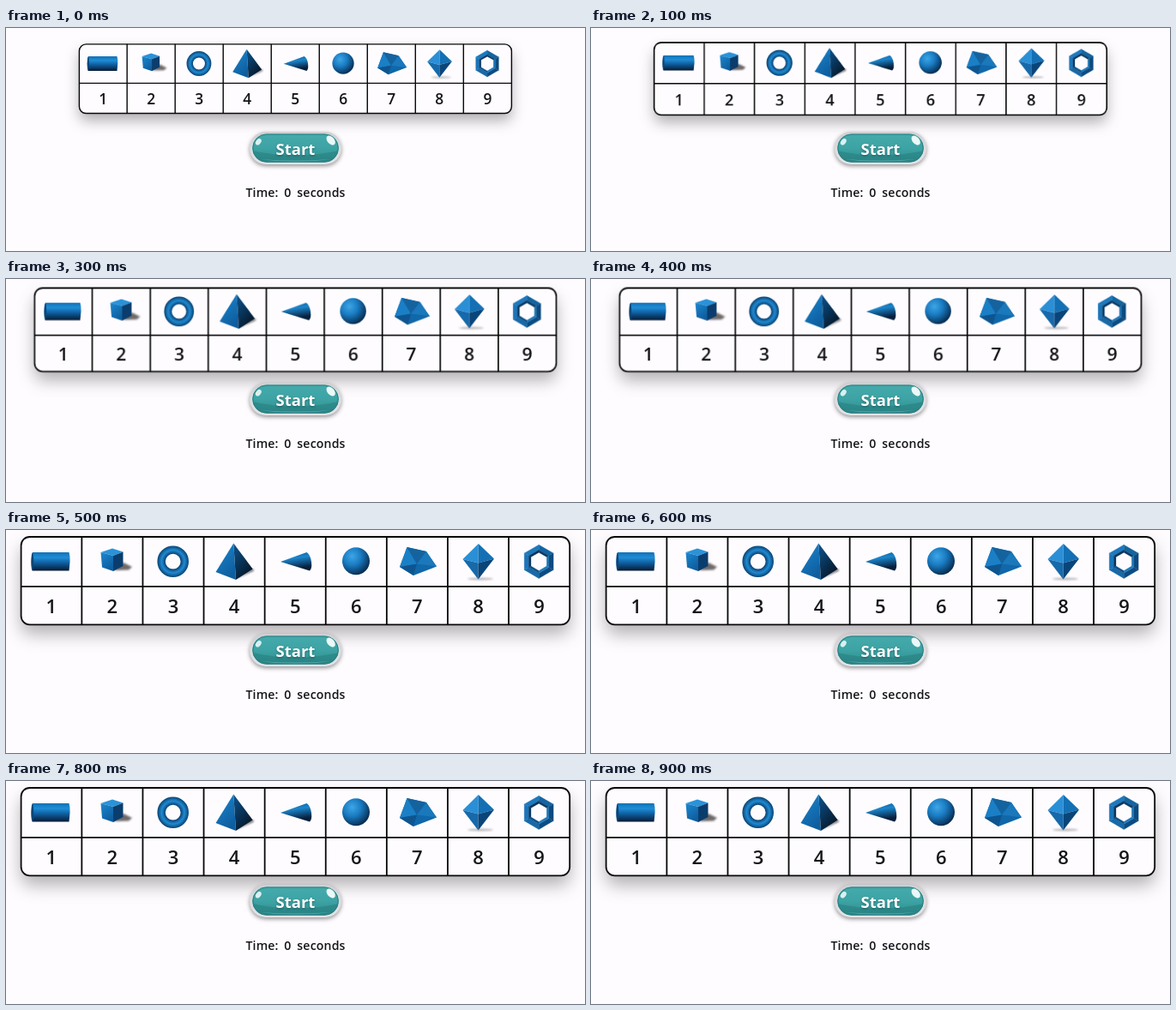
Recreate the animation shown at these times as an HTML page. Size 675x260 px, loop 1 s.

```html
<!DOCTYPE html>
<html lang="en">
<head>
<meta charset="utf-8">
<title>Shape key</title>
<style>
  html, body { margin: 0; width: 100%; height: 100%; overflow: hidden; background: #fefcff; }
  svg { display: block; width: 675px; height: 260px; }
  text { font-family: "Open Sans", "Noto Sans", sans-serif; text-anchor: middle; fill: #151519; }
  #key { transform-origin: 337.4px 59.2px; }
  .card { fill: #fefcff; filter: drop-shadow(0 11px 10px rgba(0, 0, 0, .3)); }
  .grid { fill: none; stroke: #08080a; stroke-width: 1.8; }
  .digit { font-size: 22px; font-weight: 600; }
  .time { font-size: 14.1px; font-weight: 600; letter-spacing: .15px; word-spacing: 3px; }
  .start { font-size: 18.5px; font-weight: 700; fill: #fff; filter: drop-shadow(0 1px 1px rgba(0, 50, 55, .5)); }
  .rim { filter: drop-shadow(0 2px 2.5px rgba(0, 0, 0, .42)); }
  .soft { filter: blur(1.1px); }
</style>
</head>
<body>
<svg viewBox="0 0 675 260">
  <defs>
    <linearGradient id="tube" x1="0" y1="0" x2="0" y2="1">
      <stop offset="0" stop-color="#1272b6"/><stop offset=".28" stop-color="#1f8dd6"/>
      <stop offset=".6" stop-color="#0e5a9a"/><stop offset="1" stop-color="#071b34"/>
    </linearGradient>
    <linearGradient id="cone" x1="0" y1="0" x2=".25" y2="1">
      <stop offset=".1" stop-color="#0e5f9e"/><stop offset=".4" stop-color="#1c86cc"/>
      <stop offset=".95" stop-color="#061f3c"/>
    </linearGradient>
    <linearGradient id="dark" x1="0" y1="0" x2=".6" y2="1">
      <stop offset="0" stop-color="#0c5590"/><stop offset="1" stop-color="#061729"/>
    </linearGradient>
    <linearGradient id="face" x1="0" y1="0" x2=".5" y2="1">
      <stop offset="0" stop-color="#1c88d0"/><stop offset="1" stop-color="#0e5e9f"/>
    </linearGradient>
    <radialGradient id="ball" cx=".36" cy=".32" r=".72">
      <stop offset="0" stop-color="#3fa6e6"/><stop offset=".45" stop-color="#1a7cc3"/>
      <stop offset="1" stop-color="#06294c"/>
    </radialGradient>
    <radialGradient id="ring" gradientUnits="userSpaceOnUse" cx="194.700" cy="36.700" r="18.500">
      <stop offset=".46" stop-color="#083c6c"/><stop offset=".72" stop-color="#1f8ad2"/>
      <stop offset="1" stop-color="#09406f"/>
    </radialGradient>
    <linearGradient id="silver" x1="0" y1="0" x2="0" y2="1">
      <stop offset="0" stop-color="#cfcfd1"/><stop offset=".5" stop-color="#dcdcde"/>
      <stop offset="1" stop-color="#e4e4e6"/>
    </linearGradient>
    <linearGradient id="teal" x1="0" y1="0" x2="0" y2="1">
      <stop offset="0" stop-color="#45aaab"/><stop offset=".5" stop-color="#3da3a4"/>
      <stop offset="1" stop-color="#2f8b8b"/>
    </linearGradient>
    <clipPath id="pill"><rect x="287.300" y="123.500" width="100.500" height="33" rx="16.500"/></clipPath>
  </defs>

  <g id="key">
    <rect class="card" x="17.600" y="8" width="639.600" height="102.300" rx="10"/>

    <path d="M31 26H73.500Q75 31 74.500 37T73.500 47.500H31Q29.500 43 29.500 37T31 26Z" fill="url(#tube)"/>
    <ellipse cx="30.800" cy="37" rx="1.400" ry="10.500" fill="#0a4577"/>

    <path class="soft" d="M126 47L137 38L147 43L143 46.500Z" fill="#4b4543" opacity=".8"/>
    <path d="M110.500 26L124 21.500L136.500 25.500L125 30Z" fill="#2a92d8"/>
    <path d="M110.500 26L125 30V48L112 43.500Z" fill="url(#face)"/>
    <path d="M125 30L136.500 25.500V42L125 48Z" fill="#0a3d6d"/>

    <circle cx="194.700" cy="36.700" r="13.600" fill="none" stroke="url(#ring)" stroke-width="9.400"/>

    <path class="soft" d="M267 57.500L288 45L289 47.500Z" fill="#666"/>
    <path d="M265.300 15.500L244.500 49L268 58Z" fill="url(#face)"/>
    <path d="M265.300 15.500L287.700 45.500L268 58Z" fill="url(#dark)"/>

    <path d="M320 37L350.500 26Q355 29 356 37T354 47.500Z" fill="url(#cone)"/>

    <circle cx="408" cy="36.300" r="16" fill="url(#ball)"/>

    <path d="M467.500 20L490 25L502 42.500L475 53L459 43Z" fill="#1067a9"/>
    <path d="M467.500 20L479 39.500L459 43Z" fill="#1b7fc6"/>
    <path d="M467.500 20L490 25L479 39.500Z" fill="#14639f"/>
    <path d="M490 25L502 42.500L479 39.500Z" fill="#1a78bb"/>
    <path d="M459 43L479 39.500L475 53Z" fill="#0e5590"/>

    <ellipse class="soft" cx="553" cy="57" rx="15" ry="1.500" fill="#777" opacity=".5"/>
    <path d="M550.800 16L532.500 34L550.500 38.500Z" fill="#2a8fd6"/>
    <path d="M550.800 16L569 33.500L550.500 38.500Z" fill="#1470b4"/>
    <path d="M532.500 34L550.500 38.500V57.500Z" fill="#1669aa"/>
    <path d="M569 33.500L550.500 38.500V57.500Z" fill="#0a457a"/>

    <g id="hex"></g>

    <path class="grid" id="lines"/>
    <rect class="grid" x="17.600" y="8" width="639.600" height="102.300" rx="10"/>
    <g id="digits"></g>
  </g>

  <rect class="rim" x="284" y="121" width="107" height="38" rx="19" fill="url(#silver)"/>
  <g clip-path="url(#pill)">
    <rect x="287" y="123" width="102" height="34" fill="url(#teal)"/>
    <path d="M287 143Q337 154 388 143V158H287Z" fill="#247c7e" opacity=".5"/>
    <path d="M296 153Q337 159 379 153Q337 156 296 153Z" fill="#6cc4c4" opacity=".6"/>
  </g>
  <rect x="287.800" y="124" width="99.500" height="32" rx="16" fill="none" stroke="#287f82"/>
  <ellipse cx="294.300" cy="132.700" rx="4.200" ry="2.800" fill="#d9f1f0" transform="rotate(-52 294.300 132.700)"/>
  <ellipse cx="378.700" cy="131" rx="6.300" ry="4" fill="#ebf8f7" transform="rotate(48 378.700 131)"/>
  <text class="start" x="337.400" y="148">Start</text>
  <text class="time" x="337.500" y="197">Time: 0 seconds</text>
</svg>

<script>
const byId = id => document.getElementById(id);
const NS = "http://www.w3.org/2000/svg";
const COL = 71.1, MID = 337.2;

function add(parent, tag, attrs, text = "") {
  const el = document.createElementNS(NS, tag);
  for (const k in attrs) el.setAttribute(k, attrs[k]);
  el.textContent = text;
  parent.append(el);
}

let lines = "M17.6 65.8H657.2";
for (let i = 0; i < 9; i++) {
  const x = MID + (i - 4) * COL;
  if (i) lines += `M${x - COL / 2} 8V110.3`;
  add(byId("digits"), "text", { class: "digit", x, y: 97 }, i + 1);
}
byId("lines").setAttribute("d", lines);

// Hexagonal ring: six outer facets, then six narrow inner walls
const corner = (i, r) => {
  const a = (i * 60 - 90) * Math.PI / 180;
  return `${621.2 + r * Math.cos(a)},${36.8 + r * Math.sin(a)}`;
};
function band(r1, r2, colors) {
  colors.forEach((fill, i) => add(byId("hex"), "polygon", {
    points: [corner(i, r1), corner(i + 1, r1), corner(i + 1, r2), corner(i, r2)].join(" "),
    fill, stroke: fill, "stroke-width": .3
  }));
}
band(19.6, 13.5, ["#14649f", "#0c4a7e", "#0d4c82", "#1869a8", "#1b75b8", "#1d79bd"]);
band(13.5, 10.6, ["#0a3c69", "#1a70b0", "#1d78ba", "#0e5189", "#08345e", "#08345e"]);

// [time in ms, scale]
const steps = [[0, .788], [100, .825], [200, .8635], [300, .951], [500, 1], [1000, 1]];
byId("key").animate(
  steps.map(([t, s]) => ({ offset: t / 1000, transform: `scale(${s})`, easing: "step-end" })),
  { duration: 1000, iterations: Infinity }
);
</script>
</body>
</html>
```
